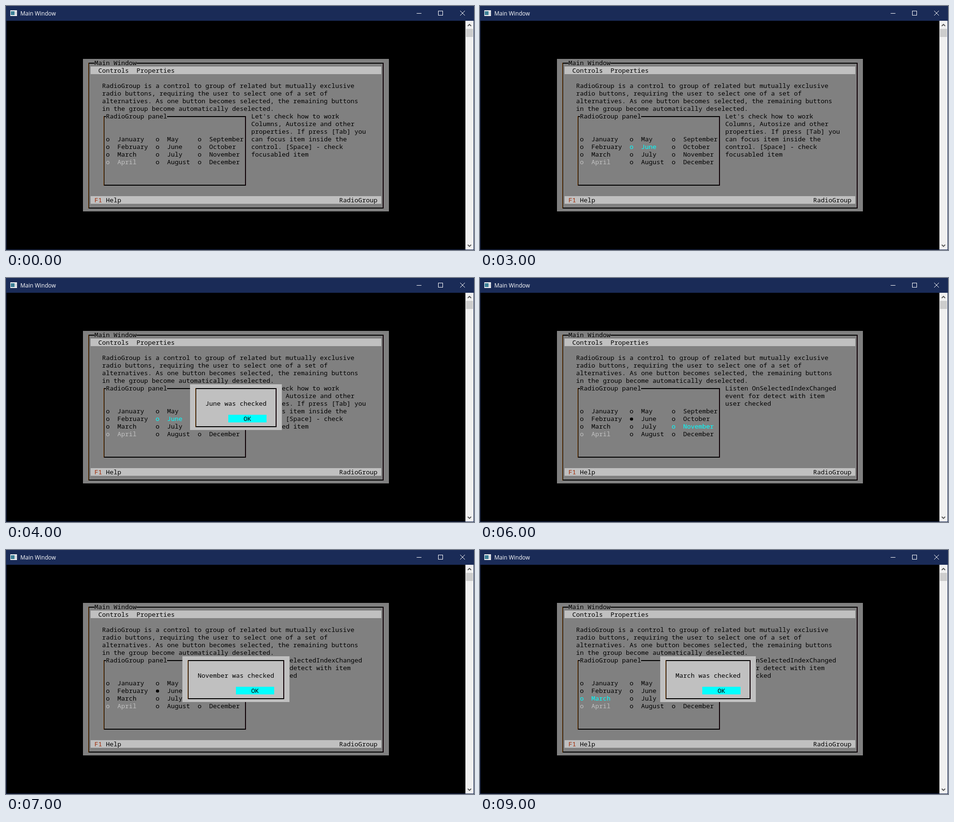
Write an HTML page with a canvas that moves like this. It is 979 px wide and 512 px high and loops after 10 s.

```html
<!DOCTYPE html>
<html lang="en">
<head>
<meta charset="utf-8">
<title>Main Window</title>
<style>
  html, body { margin: 0; width: 100%; height: 100%; overflow: hidden; background: #000; }
  canvas { display: block; }
</style>
</head>
<body>
<canvas id="stage" width="979" height="512"></canvas>
<script>
const ctx = document.getElementById('stage').getContext('2d');
const ROW = 16, CHAR = 8;
const NAVY = '#1a2b57', GRAY = '#808080', SILVER = '#c0c0c0', CYAN = '#00ffff', BLACK = '#000';
const MONO = '13.333px "Noto Sans Mono", "DejaVu Sans Mono", monospace';

const months = ['January', 'February', 'March', 'April', 'May', 'June', 'July',
  'August', 'September', 'October', 'November', 'December'];
const columns = [209, 313, 401];

const intro = [
  'RadioGroup is a control to group of related but mutually exclusive',
  'radio buttons, requiring the user to select one of a set of',
  'alternatives. As one button becomes selected, the remaining buttons',
  'in the group become automatically deselected.'];
const hint = [
  "Let's check how to work",
  'Columns, Autosize and other',
  'properties. If press [Tab] you',
  'can focus item inside the',
  'control. [Space] - check',
  'focusabled item'];
const eventHint = [
  'Listen OnSelectedIndexChanged',
  'event for detect with item',
  'user checked'];

// One state per second; dialogX is the left edge of the message box.
const states = [
  {},
  { focus: 'January' },
  { focus: 'May' },
  { focus: 'June' },
  { focus: 'June', dialogX: 385 },
  { focus: 'July', checked: 'June' },
  { focus: 'November', checked: 'June' },
  { focus: 'November', checked: 'June', dialogX: 369 },
  { focus: 'March', checked: 'November' },
  { focus: 'March', checked: 'November', dialogX: 377 }];

function rect(x, y, w, h, color) {
  ctx.fillStyle = color;
  ctx.fillRect(x, y, w, h);
}

// x and y are the top left corner of the first character cell.
function text(str, x, y, color = BLACK) {
  ctx.font = MONO;
  ctx.fillStyle = color;
  ctx.fillText(str, x, y + 13);
}

function lines(list, x, y) {
  list.forEach((str, i) => text(str, x, y + i * ROW));
}

function stroke(points, color, width) {
  ctx.strokeStyle = color;
  ctx.lineWidth = width;
  ctx.beginPath();
  points.forEach(([x, y]) => ctx.lineTo(x, y));
  ctx.stroke();
}

// Box-drawing frame between two cells, with a title set into its top edge.
function frame(left, top, right, bottom, title = '', titleX = 0) {
  const x = left + 3, y = top + 8, w = right - left + 2, h = bottom - top + 2;
  const titleEnd = titleX + title.length * CHAR;
  if (title) {
    rect(x, y, titleX - x, 2, BLACK);
    rect(titleEnd, y, x + w - titleEnd, 2, BLACK);
    text(title, titleX, top);
  } else {
    rect(x, y, w, 2, BLACK);
  }
  rect(x, y + h - 2, w, 2, BLACK);
  rect(x, y, 1, h, '#784610');
  rect(x + 1, y, 1, h, '#140800');
  rect(x + w - 2, y, 2, h, '#100006');
}

function windowChrome() {
  rect(0, 0, 979, 512, NAVY);
  rect(1, 31, 960, 480, BLACK);

  rect(9, 9, 14, 12, '#f4f4f4');
  rect(10, 11, 8, 8, '#3c7f96');
  rect(19, 11, 3, 8, '#cfd4dc');

  ctx.font = '11.7px "Open Sans", "Noto Sans", sans-serif';
  ctx.fillStyle = '#fff';
  ctx.fillText('Main Window', 30, 20);

  rect(859, 15, 10, 1, '#fff');
  ctx.strokeStyle = '#fff';
  ctx.lineWidth = 1;
  ctx.strokeRect(904.5, 10.5, 9, 9);
  stroke([[950, 10], [960, 20]], '#fff', 1);
  stroke([[960, 10], [950, 20]], '#fff', 1);

  rect(961, 31, 17, 480, '#f0f0f0');
  rect(962, 48, 15, 17, '#cdcdcd');
  stroke([[966, 42], [969.5, 38.5], [973, 42]], '#505050', 1.8);
  stroke([[966, 501], [969.5, 504.5], [973, 501]], '#505050', 1.8);
}

function radio(month, index, state) {
  const x = columns[Math.floor(index / 4)], y = 271 + index % 4 * ROW;
  const color = month === state.focus ? CYAN : month === 'April' ? SILVER : BLACK;
  if (month === state.checked) {
    ctx.fillStyle = color;
    ctx.beginPath();
    ctx.arc(x + 4, y + 9, 3.3, 0, Math.PI * 2);
    ctx.fill();
  } else {
    text('o', x, y, color);
  }
  text(month, x + 24, y, color);
}

function dialog(x, message) {
  const w = message.length * CHAR + 64, right = x + w;
  rect(x, 223, w, 96, SILVER);
  frame(x + CHAR, 223, right - 2 * CHAR, 303);
  text(message, x + 32, 255);
  rect(right - 112, 287, 80, ROW, CYAN);
  text('OK', right - 80, 287);
}

function draw(second) {
  const state = states[second];
  windowChrome();

  rect(161, 111, 640, 320, GRAY);
  frame(169, 111, 785, 415, 'Main Window', 185);
  rect(177, 127, 608, ROW, SILVER);
  text('Controls', 193, 127);
  text('Properties', 273, 127);
  rect(177, 399, 608, ROW, SILVER);
  text('F1', 185, 399, '#a02c08');
  text('Help', 209, 399);
  text('RadioGroup', 697, 399);

  lines(intro, 201, 159);
  lines(second < 5 ? hint : eventHint, 513, 223);
  frame(201, 223, 497, 367, 'RadioGroup panel', 209);
  months.forEach((month, i) => radio(month, i, state));

  if (state.dialogX) dialog(state.dialogX, state.focus + ' was checked');
}

const start = performance.now();
function tick() {
  draw(Math.floor((performance.now() - start) / 1000) % states.length);
  requestAnimationFrame(tick);
}
tick();
</script>
</body>
</html>
```
